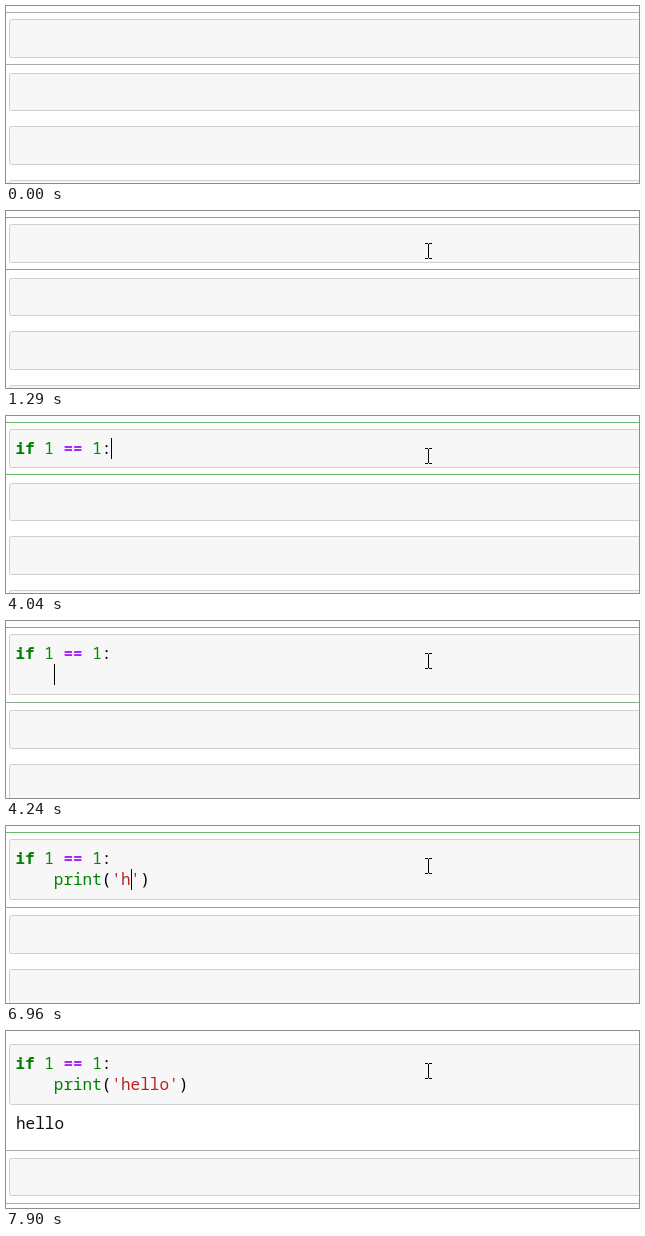
Write an HTML page that moves like this. It is 633x177 px and loops after 8 s.

```html
<!DOCTYPE html>
<html lang="en">
<head>
<meta charset="utf-8">
<title>Typing in a notebook cell</title>
<style>
  html, body { margin: 0; width: 633px; height: 177px; overflow: hidden; background: #fff; }
  svg { display: block; }
  text { font: 16px "Noto Sans Mono", "DejaVu Sans Mono", monospace; white-space: pre; fill: #000; }
  .cell { fill: #f7f7f7; stroke: #cfcfcf; }
  .keyword { fill: #008000; font-weight: bold; }
  .builtin { fill: #008000; }
  .number { fill: #080; }
  .operator { fill: #a2f; font-weight: bold; }
  .string { fill: #ba2121; }
  .match { fill: #0b0; }
</style>
</head>
<body>
<svg width="633" height="177" viewBox="0 0 633 177">
  <g id="cells"></g>
  <g id="rules"></g>
  <text id="line0" x="9.4" y="38"></text>
  <text id="line1" x="9.4" y="59"></text>
  <text id="output" x="10" y="98" style="fill:#111">hello</text>
  <rect id="caret" width="1" height="21"/>
  <path id="pointer" d="M-3-7.5H0M1-7.5H4M.5-7V7M-3 7.5H0M1 7.5H4" stroke="#000" fill="none"/>
</svg>
<script>
const LOOP = 8000, LEFT = 9.4, ADVANCE = 9.6, LINE = 21;
const GREY = '#ababab', GREEN = '#66bb6a';
const $ = id => document.getElementById(id);

// Cells are [top, bottom]; rules are the y of the selected cell's edges.
const layouts = [
  { at: 0, cells: [[13, 51], [67, 104], [120, 158], [174, 212]], rules: [6, 58], colors: [GREY, GREY] },
  { at: 760, cells: [[13, 51], [67, 104], [120, 158], [174, 212]], rules: [6, 58], colors: [GREEN, GREEN] },
  { at: 4240, cells: [[13, 73], [89, 127], [143, 181]], rules: [6, 81], colors: [GREEN, '#8faa90'] },
  { at: 7900, cells: [[13, 73], [127, 164]], rules: [119, 172], colors: [GREY, GREY] }
];

const pointerPath = [
  [130, 528, 134], [200, 495, 101], [270, 462, 71], [420, 457, 73],
  [490, 448, 66], [560, 436, 55], [620, 426, 44], [690, 422, 40]
].map(([at, x, y]) => ({ at, x, y }));

// "|" marks the caret; a step without it is the caret's blink.
const first = 'if 1 == 1:';
const edits = [
  [0, ''], [760, '|'], [1290, ''], [1620, 'i|'], [1690, 'if|'], [1820, 'if |'],
  [2090, 'if 1|'], [2560, 'if 1 |'], [2690, 'if 1 =|'], [2830, 'if 1 ==|'],
  [3030, 'if 1 == |'], [3580, 'if 1 == '], [3710, 'if 1 == 1|'], [4040, first + '|'],
  ...[
    [4240, '|'], [4790, ''], [5180, 'p|'], [5250, 'pr|'], [5450, 'pri|'],
    [5510, 'prin|'], [5640, 'print|'], [5900, 'print(|)'], [6430, 'print()'],
    [6690, "print('|')"], [6960, "print('h|')"], [7090, "print('he|')"],
    [7160, "print('hel|')"], [7290, "print('hell|')"], [7490, "print('hello|')"],
    [7900, "print('hello')"]
  ].map(([at, code]) => [at, first + '\n    ' + code])
].map(([at, code]) => ({ at, code }));

const latest = (steps, t) => steps.filter(s => s.at <= t).pop();

const tokens = [
  ['keyword', /^if$/], ['builtin', /^print$/], ['number', /^\d$/],
  ['operator', /^=+$/], ['string', /^'/]
];

function highlight(code) {
  return code.replace(/'[^']*'|\w+|=+|\(\)/g, word => {
    const kind = word === '()' ? 'match' : (tokens.find(([, re]) => re.test(word)) || [])[0];
    return kind ? `<tspan class="${kind}">${word}</tspan>` : word;
  });
}

function drawLayout({ cells, rules, colors }) {
  $('cells').innerHTML = cells.map(([top, bottom]) =>
    `<rect class="cell" x="3.5" y="${top + .5}" width="640" height="${bottom - top}" rx="2"/>`).join('');
  $('rules').innerHTML = rules.map((y, i) =>
    `<rect y="${y}" width="633" height="1" fill="${colors[i]}"/>`).join('');
}

function drawCode({ code }) {
  const lines = code.split('\n');
  const row = lines.findIndex(s => s.includes('|'));
  $('caret').style.display = row < 0 ? 'none' : '';
  if (row >= 0) {
    $('caret').setAttribute('x', Math.round(LEFT + ADVANCE * lines[row].indexOf('|')));
    $('caret').setAttribute('y', 22 + LINE * row);
  }
  [0, 1].forEach(i => {
    $('line' + i).innerHTML = highlight((lines[i] || '').replace('|', ''));
  });
}

function drawPointer(p) {
  $('pointer').style.display = p ? '' : 'none';
  if (p) $('pointer').setAttribute('transform', `translate(${p.x} ${p.y})`);
}

let layout, edit;
function draw(t) {
  const nextLayout = latest(layouts, t), nextEdit = latest(edits, t);
  if (nextLayout !== layout) drawLayout(layout = nextLayout);
  if (nextEdit !== edit) drawCode(edit = nextEdit);
  drawPointer(latest(pointerPath, t));
  $('output').style.display = t < 7900 ? 'none' : '';
}

const start = performance.now();
function tick() {
  draw((performance.now() - start) % LOOP);
  requestAnimationFrame(tick);
}
tick();
</script>
</body>
</html>
```
